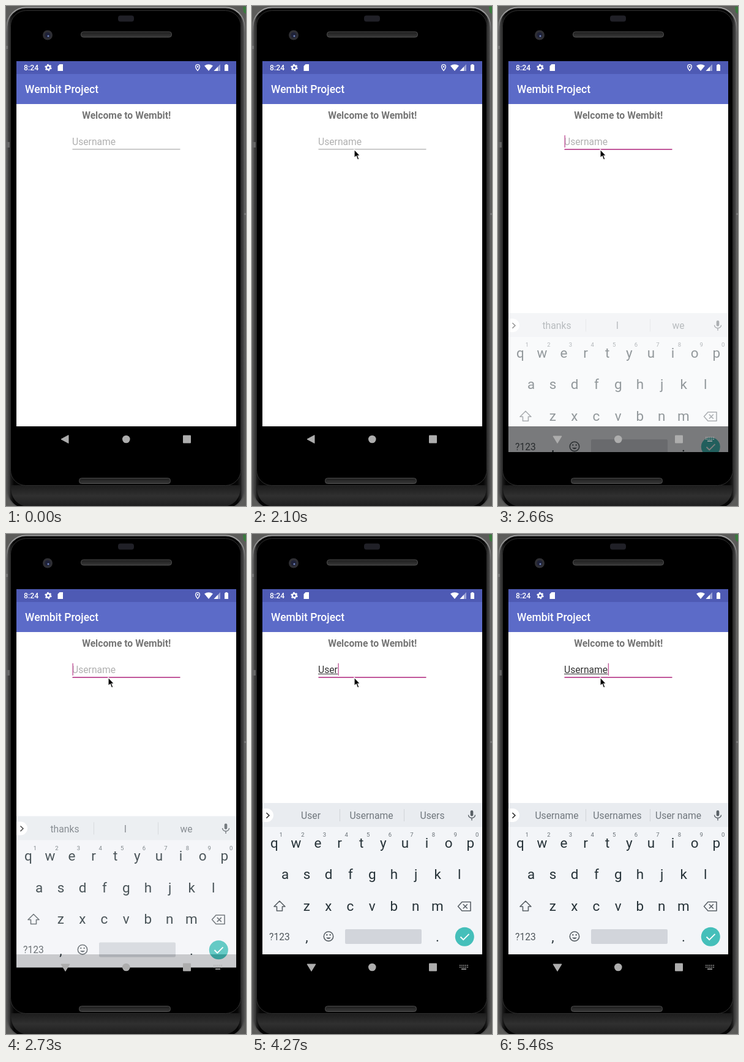
These frames come from a looping animation (392x816 px, 5.53 s). An HTML page:

```html
<!DOCTYPE html>
<html lang="en">
<head>
<meta charset="utf-8">
<style>
  html, body { margin: 0; width: 100%; height: 100%; overflow: hidden; background: #5c5c5a; }
  svg { display: block; width: 392px; height: 816px; }
  text { font-family: Roboto, sans-serif; font-size: 15.7px; white-space: pre; }
  .mid { text-anchor: middle; }
  .key { font-size: 22.5px; fill: #263238; }
  .hint { font-size: 9.5px; fill: #687076; }
  .line { fill: none; stroke: #596066; stroke-width: 1.6; }
</style>
</head>
<body>
<svg viewBox="0 0 392 816">
  <defs>
    <linearGradient id="rim">
      <stop offset="0" stop-color="#4a4a4a"/>
      <stop offset=".01" stop-color="#3a3a3a"/>
      <stop offset=".016" stop-color="#1c1c1c"/>
      <stop offset=".03" stop-color="#050505"/>
      <stop offset=".97" stop-color="#050505"/>
      <stop offset=".984" stop-color="#1c1c1c"/>
      <stop offset=".99" stop-color="#3a3a3a"/>
      <stop offset="1" stop-color="#4a4a4a"/>
    </linearGradient>
    <linearGradient id="shine" x2="0" y2="1">
      <stop offset="0" stop-color="#a0a0a0"/>
      <stop offset=".05" stop-color="#686868"/>
      <stop offset="1" stop-color="#505050"/>
    </linearGradient>
    <linearGradient id="chin" x2="0" y2="1">
      <stop offset="0" stop-color="#1c1c1c"/>
      <stop offset=".5" stop-color="#303030"/>
      <stop offset="1" stop-color="#1e1e1e"/>
    </linearGradient>
    <linearGradient id="grille" x2="0" y2="1">
      <stop offset="0" stop-color="#1d1d1d"/>
      <stop offset="1" stop-color="#383838"/>
    </linearGradient>
    <clipPath id="display"><rect x="17" y="90" width="359" height="638"/></clipPath>
  </defs>

  <!-- phone -->
  <rect width="392" height="816" fill="#5c5c5a"/>
  <path d="M387 1h5v12l-4-3z" fill="#397a3d"/>
  <rect x="1.500" y="2.500" width="388" height="818" rx="31" fill="url(#rim)" stroke="url(#shine)" stroke-width="2"/>
  <path d="M8 782H383V788Q381 812 358 817H33Q10 812 8 788Z" fill="url(#chin)"/>
  <rect x="7.500" y="7.500" width="376" height="775" rx="25" stroke="#303030"/>
  <rect y="65" width="3" height="5" fill="#777"/>
  <rect y="222" width="6" height="9" fill="#666"/>
  <rect x="389" y="338" width="3" height="3" fill="#777"/>
  <rect x="183" y="15.500" width="26" height="10" rx="4" fill="#202027"/>
  <g fill="url(#grille)" stroke="#4c4c4c">
    <rect x="122.500" y="42" width="148" height="9" rx="4"/>
    <rect x="119.500" y="770.500" width="149" height="9" rx="4"/>
  </g>
  <circle cx="68" cy="47.500" r="8" fill="#2f2f34"/>
  <circle cx="68" cy="47.500" r="4.500" fill="#1e2138"/>
  <circle cx="69" cy="49" r="1.500" fill="#7388c0"/>

  <!-- app -->
  <rect x="17" y="90" width="359" height="596" fill="#fff"/>
  <rect x="17" y="90" width="359" height="21" fill="#4e5ab4"/>
  <rect x="17" y="111" width="359" height="49" fill="#5c6bc8"/>
  <g fill="#fff">
    <text x="29" y="105" style="font-size:12.3px;font-weight:500">8:24</text>
    <circle cx="69" cy="100.500" r="3.200" fill="none" stroke="#fff" stroke-width="2.400"/>
    <circle cx="69" cy="100.500" r="4.900" fill="none" stroke="#fff" stroke-width="1.600" stroke-dasharray="2.600 2.530"/>
    <path d="M87.500 95H93V106H84.500V98z"/>
    <path id="pin" fill-rule="evenodd" d="M313 95a4 4 0 0 1 4 4q0 3-4 7.500q-4-4.500-4-7.500a4 4 0 0 1 4-4zm0 1.300a2.700 2.700 0 0 0-2.700 2.700q0 2 2.700 5.400q2.700-3.400 2.700-5.400a2.700 2.700 0 0 0-2.700-2.700zm0 1.500a1.300 1.300 0 1 0 .01 0z"/>
    <path d="M324 97.500q7-4.500 14 0L331 106z"/>
    <path d="M350 95V106H339.500z" opacity=".45"/>
    <path d="M346 99.200V106H339.500z"/>
    <path d="M358.500 95h3v1.200h1.500V106h-6V96.200h1.500z"/>
    <text x="31" y="142" style="font-size:17.5px;font-weight:500">Wembit Project</text>
  </g>
  <text x="196.700" y="183.500" class="mid" fill="#757575" font-weight="700">Welcome to Wembit!</text>
  <text id="entry" x="108" y="227"></text>
  <rect id="composing" x="108" y="228" height="1" fill="#333"/>
  <rect id="fieldLine" x="108.500" width="176"/>
  <rect id="caret" y="211" width="1.400" height="20" fill="#c2589b"/>

  <!-- keyboard -->
  <g clip-path="url(#display)">
    <g id="keyboard">
      <rect x="17" y="439" width="359" height="247" fill="#f3f5f8"/>
      <rect x="17" y="439" width="359" height="39" fill="#e9ecf0"/>
      <path d="M17 448h7a11 11 0 0 1 0 22h-7z" fill="#fff"/>
      <path d="M23.500 455l4.500 4.300l-4.500 4.300" class="line" style="stroke:#333"/>
      <path d="M143.500 449v20M248.500 449v20" stroke="#d0d4d8"/>
      <rect x="356.700" y="451" width="4.600" height="9.500" rx="2.300" fill="#596066"/>
      <path d="M353.500 458.500a5.500 5 0 0 0 11 0M359 463.500v4" class="line" style="stroke-width:1.400"/>
      <path d="M45 599L54 608H49.500V615H40.500V608H36z" class="line" stroke-linejoin="round"/>
      <path d="M343 600.500H357V615H343L336.500 607.700zM344.800 604.300l7 7m0-7l-7 7" class="line" stroke-linejoin="round"/>
      <text x="45" y="662.500" class="mid" fill="#50575c">?123</text>
      <circle cx="125" cy="656.700" r="7.700" class="line"/>
      <path d="M121 658.500q4 5 8 0z" fill="#596066"/>
      <circle cx="122.300" cy="654.300" r="1.200" fill="#596066"/>
      <circle cx="127.700" cy="654.300" r="1.200" fill="#596066"/>
      <rect x="152" y="645" width="125" height="24" rx="2" fill="#d2d5db"/>
      <circle cx="347.300" cy="657.300" r="15.500" fill="#45bfba"/>
      <path d="M340.500 657.500l4.700 4.700l9.300-9.300" fill="none" stroke="#fff" stroke-width="1.900"/>
    </g>
  </g>

  <!-- navigation -->
  <g fill="#adadad">
    <path id="back" stroke="#adadad" stroke-linejoin="round"/>
    <circle cx="196.300" cy="707" r="6.300"/>
    <rect x="289" y="700.500" width="13" height="13" rx="1"/>
    <g id="imeIcon" stroke="#adadad" stroke-width="1.600">
      <path d="M339 704h14M339 707h14" stroke-dasharray="1.700 1.370"/>
      <path d="M342 710h8"/>
    </g>
  </g>
  <path id="pointer" d="M0 0V14L3.200 11L5.500 17L8 15.900L5.700 10.300H9.700Z" stroke="#fff" stroke-width="1.200"/>
</svg>

<script>
const LOOP = 5530, STEP = 70;
const FOCUS = 2450, RISE = 2590, PIN_GONE = 2940;
const ACCENT = '#c2589b';
const typed = [
  [0, '', 'thanks,I,we'],
  [3640, 'U', 'U,I,You'],
  [3850, 'Us', 'Us,Use,Using'],
  [4060, 'Use', 'Use,User,Used'],
  [4200, 'User', 'User,Username,Users'],
  [4480, 'Usern', 'Usern,Username,Users'],
  [4690, 'Userna', 'Userna,Username,Usernames'],
  [4900, 'Usernam', 'Usernam,Username,Usernames'],
  [5040, 'Username', 'Username,Usernames,User name'],
];

const $ = id => document.getElementById(id);
const set = (id, attrs) => {
  for (const name in attrs) $(id).setAttribute(name, attrs[name]);
};
const show = (id, on) => set(id, { visibility: on ? 'visible' : 'hidden' });

function label(x, y, content, className) {
  const node = document.createElementNS('http://www.w3.org/2000/svg', 'text');
  node.setAttribute('x', x);
  node.setAttribute('y', y);
  node.setAttribute('class', 'mid ' + className);
  node.textContent = content;
  $('keyboard').append(node);
  return node;
}

[['qwertyuiop', 36.3, 511.5], ['asdfghjkl', 54, 563], ['zxcvbnm', 89.3, 614.5]].forEach(([keys, x, y], row) => {
  [...keys].forEach((key, i) => {
    const keyX = x + i * 35.6;
    label(keyX, y, key, 'key');
    if (row === 0) label(keyX + 11, 494, (i + 1) % 10, 'hint');
  });
});
label(89.5, 665, ',', 'key');
label(303, 665, '.', 'key');
const suggestions = [96, 195, 294.5].map(x => label(x, 465, '', ''));
suggestions.forEach(node => node.setAttribute('fill', '#70777d'));

function drawPointer(t) {
  const p = Math.min(1, Math.max(0, (t - 1540) / 490));
  const e = p * p * (3 - 2 * p);
  const x = 175 * (1 - e) ** 2 + 2 * 127 * e * (1 - e) + 167 * e * e;
  set('pointer', { transform: `translate(${x} ${687 - 453 * e})` });
  show('pointer', t >= 1540);
}

function drawField(t) {
  const [since, value, words] = typed.findLast(([start]) => t >= start);
  const focused = t >= FOCUS;
  $('entry').textContent = value || 'Username';
  set('entry', { fill: value ? '#333' : '#b0b0b0' });
  const width = value ? $('entry').getComputedTextLength() : 0;
  set('composing', { width });
  set('fieldLine', focused
    ? { y: 233, height: 2, fill: ACCENT }
    : { y: 233.3, height: 1, fill: '#999' });
  set('caret', { x: 108.5 + width });
  show('caret', focused && (t - Math.max(FOCUS, since)) % 1000 < 500);
  words.split(',').forEach((word, i) => suggestions[i].textContent = word);
}

function drawKeyboard(t) {
  const left = 1 - Math.min(1, Math.max(0, (t - RISE) / 240));
  const hidden = left * left;
  set('keyboard', { opacity: 1 - hidden, transform: `translate(0 ${124 * hidden})` });
  const open = t >= RISE;
  set('back', { d: open ? 'M90 702H104L97 713.500z' : 'M90 707L102 700.500V713.500z' });
  show('imeIcon', open);
}

function draw(now) {
  const t = Math.floor(now % LOOP / STEP) * STEP;
  drawPointer(t);
  drawField(t);
  drawKeyboard(t);
  show('pin', t < PIN_GONE);
  requestAnimationFrame(draw);
}
draw(0);
</script>
</body>
</html>
```
